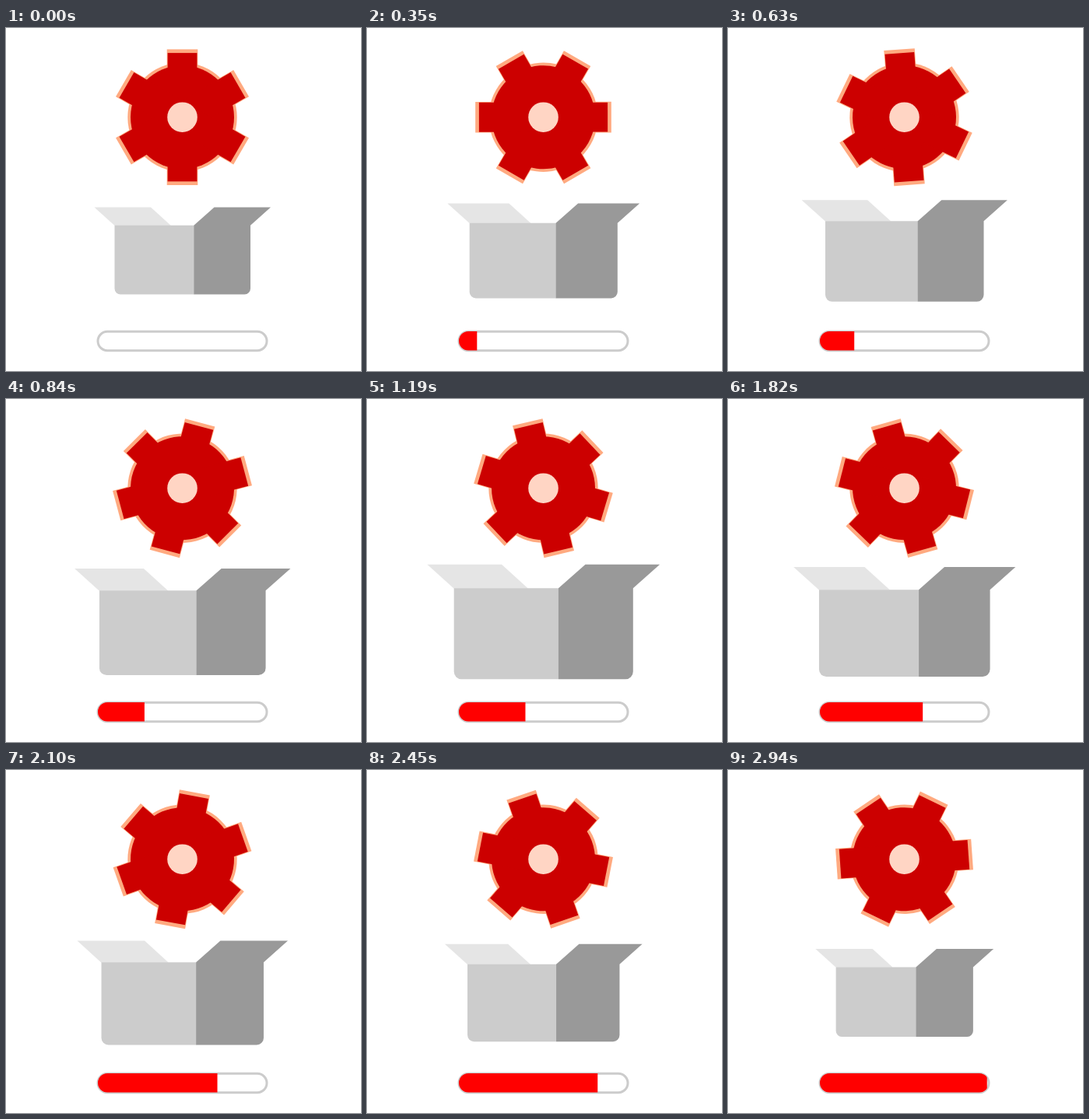
An HTML page for the animation above (3.01 s loop, 456x441 px).

```html
<!DOCTYPE html>
<html lang="en">
<head>
<meta charset="utf-8">
<title>Gear and box loader</title>
<style>
  html, body { margin: 0; width: 100%; height: 100%; overflow: hidden; background: #fff; }
  svg { display: block; width: 456px; height: 441px; }
</style>
</head>
<body>
<svg viewBox="0 0 456 441">
  <defs>
    <clipPath id="track"><rect x="118" y="390" width="217" height="24.5" rx="12.2"/></clipPath>
    <g id="teeth">
      <rect id="pair" x="-.5" y="-1" width="1" height="2"/>
    </g>
  </defs>

  <g transform="translate(226.5 114.7)">
    <g id="gear"></g>
    <circle r="19.3" fill="#ffd5c4"/>
  </g>

  <g id="box">
    <path fill="#e5e5e5" d="M113.5 230.5H186L211.8 254H139.5Z"/>
    <path fill="#ccc" d="M139.5 253.7H241.5V342.5H147a7.5 7.5 0 0 1-7.5-7.5Z"/>
    <path fill="#999" d="M241.3 253.7L267.5 230.5H340L314 253.7V335a7.5 7.5 0 0 1-7.5 7.5H241.3Z"/>
  </g>

  <rect x="118" y="390.3" width="217" height="24.4" rx="12.2" fill="#fff" stroke="#ccc" stroke-width="3"/>
  <rect id="fill" x="117" y="389" height="27" width="0" fill="#f00" clip-path="url(#track)"/>
</svg>

<script>
const LOOP = 3010, STEP = 70;
const PEAK = 0.45, GROWTH = 0.363, TURN = 270, TRACK = 219;
// [step, progress]: the pace is slightly uneven
const PACE = [[0, 0], [5, .111], [12, .278], [23, .535], [30, .7055], [35, .8185], [42, .985]];

const byId = id => document.getElementById(id);
const gear = byId('gear'), box = byId('box'), fill = byId('fill');

function gearLayer(color, radius, reach, width) {
  let parts = `<circle r="${radius}"/>`;
  for (const angle of [0, 60, 120]) {
    parts += `<rect x="${-width / 2}" y="${-reach}" width="${width}" height="${2 * reach}" transform="rotate(${angle})"/>`;
  }
  return `<g fill="${color}">${parts}</g>`;
}
gear.innerHTML = gearLayer('#ffaa80', 70.2, 87.3, 39.6) + gearLayer('#c00', 66.5, 82.6, 37.8);

function progress(step) {
  const i = Math.max(1, PACE.findIndex(([s]) => s >= step));
  const [s0, p0] = PACE[i - 1], [s1, p1] = PACE[i];
  return p0 + (p1 - p0) * (step - s0) / (s1 - s0);
}

function draw(time) {
  const p = progress(Math.floor(time % LOOP / STEP));
  const swell = p < PEAK ? p / PEAK : (1 - p) / (1 - PEAK);
  gear.setAttribute('transform', `rotate(${TURN * p})`);
  box.setAttribute('transform',
    `translate(226.75 286.5) scale(${1 + GROWTH * swell}) translate(-226.75 -286.5)`);
  fill.setAttribute('width', TRACK * p);
}

const start = performance.now();
function tick() {
  draw(performance.now() - start);
  requestAnimationFrame(tick);
}
tick();
</script>
</body>
</html>
```
